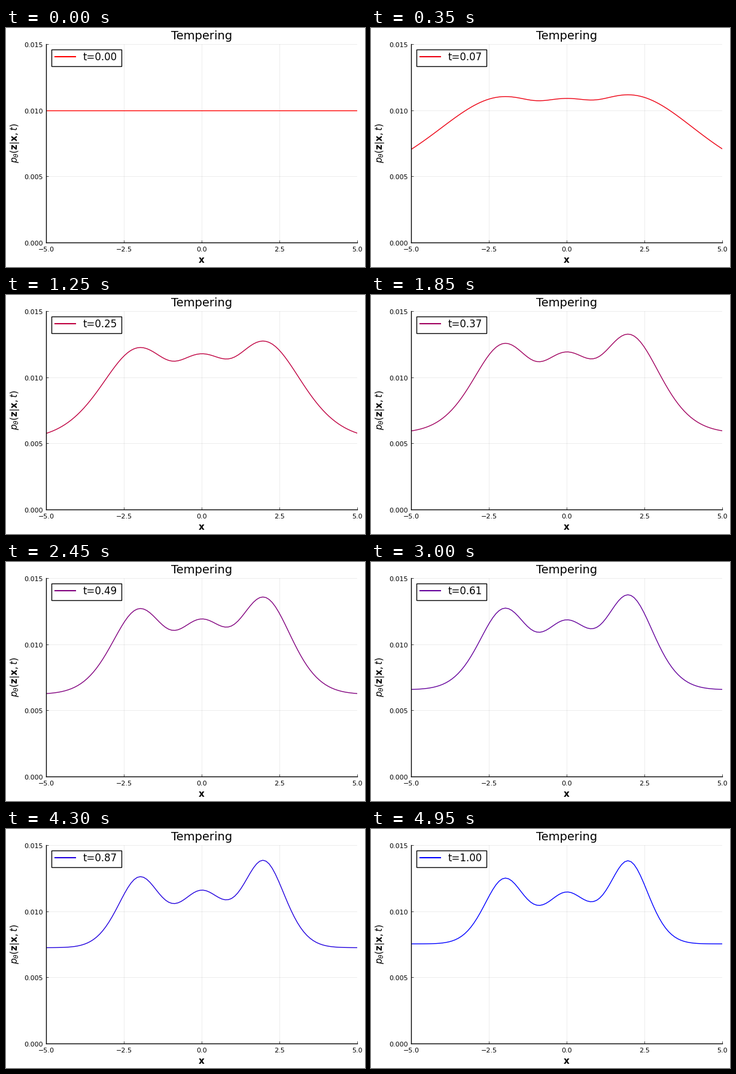
These frames come from a looping animation (600 by 400 pixels, 5000 ms). A matplotlib script:

```python
import numpy as np
import matplotlib.pyplot as plt
from matplotlib.animation import FuncAnimation
from matplotlib.lines import Line2D
from matplotlib.patches import Rectangle
from matplotlib.transforms import ScaledTranslation

WIDTH, HEIGHT, DPI = 600, 400, 100
FRAMES, INTERVAL = 100, 50
LEFT, RIGHT, TOP, BOTTOM = 67.2, 586.7, 27.2, 358.8
PT = 72 / DPI  # points per pixel

plt.rcParams["font.family"] = "DejaVu Sans"
plt.rcParams["mathtext.fontset"] = "dejavusans"

x = np.linspace(-5, 5, 100)
bumps = sum(w * np.exp(-(x - c) ** 2) for w, c in [(0.5, -2), (0.4, 0), (0.6, 2)])


def density(t):
    """Softmax of the bump mixture raised to the power t."""
    e = np.exp(bumps ** t)
    return e / e.sum()


def place(px, py):
    """Pixel position from the top left, as figure fractions."""
    return px / WIDTH, 1 - py / HEIGHT


def make_legend(size=12):
    """Boxed line sample and caption in the upper left corner."""
    em = size / PT
    left, top = LEFT + em / 2, TOP + em / 2
    width, height = 117.4, 28
    fig.add_artist(Rectangle(place(left, top + height), width / WIDTH, height / HEIGHT,
                             transform=fig.transFigure, facecolor="white",
                             edgecolor="black", linewidth=1))
    base = top + 1.1 * em
    start, y = place(left + 0.4 * em, base - 0.35 * em)
    end, _ = place(left + 2.4 * em, base)
    sample = fig.add_artist(Line2D([start, end], [y, y], transform=fig.transFigure,
                                   color="red", linewidth=1.5))
    text = fig.text(*place(left + 3.2 * em, base), "t=0.00",
                    fontsize=size, va="baseline")
    return sample, text


fig = plt.figure(figsize=(WIDTH / DPI, HEIGHT / DPI), dpi=DPI, facecolor="white")
ax = fig.add_axes([*place(LEFT, BOTTOM),
                   (RIGHT - LEFT) / WIDTH, (BOTTOM - TOP) / HEIGHT])

ax.set_xlim(-5, 5)
ax.set_ylim(0, 0.015)
ax.set_xticks([-5, -2.5, 0, 2.5, 5])
ax.set_yticks([0, 0.005, 0.01, 0.015])
ax.tick_params(direction="in", length=3, width=0.5, labelsize=8)
ax.tick_params(axis="x", pad=3.5 + 2 * PT)
nudge = ScaledTranslation(0, -1 / DPI, fig.dpi_scale_trans)
for label in ax.get_yticklabels():
    label.set_transform(label.get_transform() + nudge)

ax.set_axisbelow(True)
ax.grid(color="black", alpha=0.1, linewidth=0.5)
for side in ("top", "right"):
    ax.spines[side].set_visible(False)
for side in ("left", "bottom"):
    ax.spines[side].set_linewidth(1)

ax.set_title("Tempering", fontsize=14)
ax.set_xlabel(r"$\mathbf{x}$", fontsize=11)
ax.set_ylabel(r"$p_{\theta}(\mathbf{z}|\mathbf{x},t)$", fontsize=11)

curve, = ax.plot(x, density(0), color="red", linewidth=1)
sample, caption = make_legend()


def update(frame):
    t = frame / (FRAMES - 1)
    color = (1 - t, 0, t)
    curve.set_ydata(density(t))
    curve.set_color(color)
    sample.set_color(color)
    caption.set_text(f"t={t:.2f}")
    return curve, sample, caption


anim = FuncAnimation(fig, update, frames=FRAMES, interval=INTERVAL,
                     repeat=True, repeat_delay=0)
plt.show()
```
